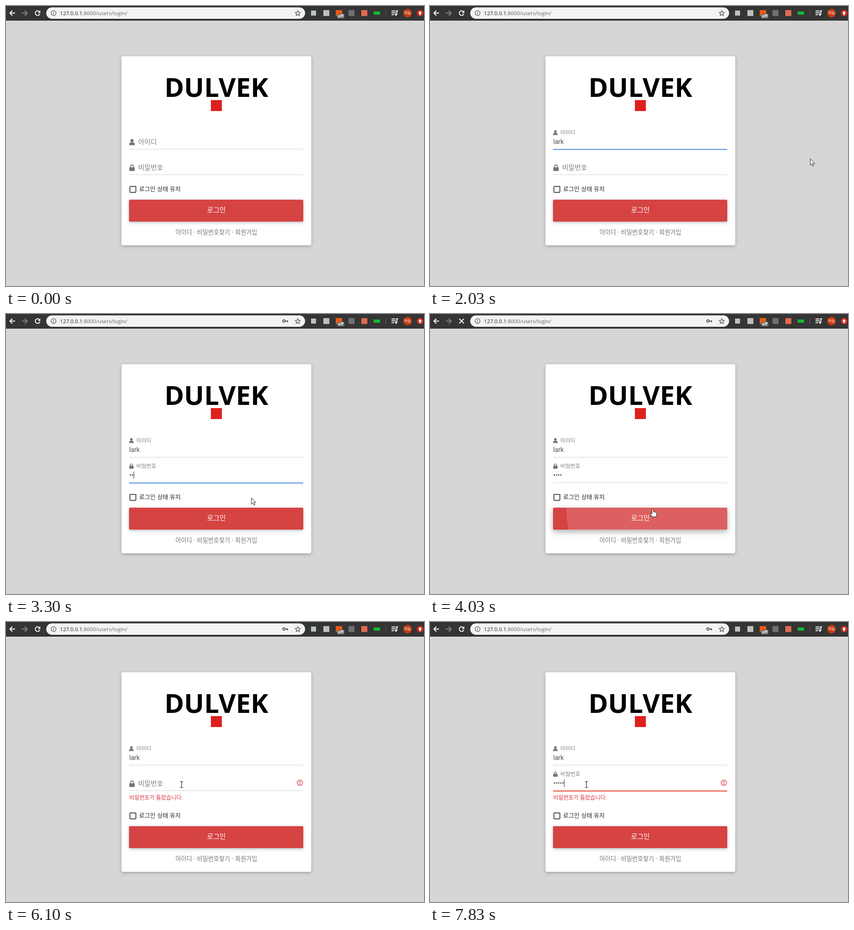
Recreate the animation shown at these times as an HTML page. Size 914 by 613 pixels, loop 8 s.

```html
<!DOCTYPE html>
<html lang="ko">
<head>
<meta charset="utf-8">
<title>로그인</title>
<style>
  html, body { margin: 0; width: 100%; height: 100%; overflow: hidden; background: #d6d6d6; }
  svg { display: block; }
  text { font-family: "Noto Sans CJK KR", "Noto Sans CJK", sans-serif; white-space: pre; }
  .url { font: 11.6px "Open Sans", "Noto Sans", sans-serif; }
  .word { font: 900 58px "Noto Sans", "Open Sans", sans-serif; }
  .value { font: 14px Roboto, sans-serif; fill: #495057; }
  .label { fill: #808080; font-size: 14.8px; font-weight: 300; }
  .line { fill: none; stroke: #fff; stroke-width: 2; }
  .ui { fill: none; stroke: #5f6368; stroke-width: 1.4; }
  #card, #button { filter: drop-shadow(0 2px 2.5px rgba(0,0,0,.16)) drop-shadow(0 2px 5px rgba(0,0,0,.12)); }
  #button.hover { filter: drop-shadow(0 5px 5.5px rgba(0,0,0,.18)) drop-shadow(0 4px 7.5px rgba(0,0,0,.15)); }
</style>
</head>
<body>
<svg width="914" height="613" viewBox="0 0 914 613">
  <defs>
    <clipPath id="buttonClip"><rect x="269" y="424" width="381" height="48" rx="2"/></clipPath>
  </defs>
  <rect width="914" height="613" fill="#d6d6d6"/>

  <!-- browser bar -->
  <rect width="914" height="32" fill="#353535"/>
  <rect y="31" width="914" height="1" fill="#292929"/>
  <path class="line" d="M20 15.5H9M14 10l-5.5 5.5L14 21"/>
  <path class="line" style="stroke:#858585" d="M35 15.5h11M41 10l5.5 5.5L41 21"/>
  <g id="reload">
    <path class="line" d="M73.2 12.4A5.1 5.1 0 1 0 74 17"/>
    <path d="M75 9.5v5.7h-5.7z" fill="#fff"/>
  </g>
  <path id="stop" class="line" d="M64 10.5l10 10M74 10.5l-10 10"/>
  <rect x="88" y="3" width="566" height="25" rx="12.5" fill="#f1f3f4"/>
  <circle class="ui" cx="104" cy="15.5" r="5.4"/>
  <path class="ui" d="M104 14.8v3.6M104 12.2v1.5"/>
  <text class="url" x="118" y="20" fill="#666"><tspan fill="#222">127.0.0.1</tspan>:8000/users/login/</text>
  <g id="key">
    <circle cx="607.6" cy="15.3" r="2.6" fill="none" stroke="#5f6368" stroke-width="2"/>
    <path d="M610.5 15.3h6.5M615 15.3v3" stroke="#5f6368" stroke-width="2.2"/>
  </g>
  <path class="ui" d="M638 10.2l1.6 3.7 4 .4-3 2.7.9 3.9-3.5-2.1-3.5 2.1.9-3.9-3-2.7 4-.4z"/>
  <rect x="667" y="10" width="11" height="11" fill="#b9c4bf"/>
  <rect x="694" y="9" width="13" height="13" fill="#bdbdbd"/>
  <rect x="721" y="9" width="14" height="13" fill="#ee5a13"/>
  <rect x="724" y="17" width="16" height="10" rx="2" fill="#6b6b6b"/>
  <text x="732" y="25" fill="#fff" text-anchor="middle" style="font:700 8.5px 'Open Sans',sans-serif">off</text>
  <rect x="749" y="9" width="13" height="13" fill="#707070"/>
  <rect x="777" y="9" width="13" height="13" fill="#e0694f"/>
  <rect x="804" y="12" width="14" height="7" fill="#16b834"/>
  <path d="M830.5 9v13" stroke="#666"/>
  <path class="line" d="M843 11h9M843 15h9M843 19h5.5M854.5 19v-8.4h3"/>
  <circle cx="852.8" cy="19" r="2.2" fill="#fff"/>
  <circle cx="878" cy="15.5" r="9.5" fill="#c23a10"/>
  <text x="878" y="18.4" fill="#fff" font-size="8" text-anchor="middle">하늘</text>
  <circle cx="905.5" cy="15.5" r="7" fill="#d92b20"/>
  <path d="M905.5 11.2l4.2 4.4h-2.6v3.9h-3.2v-3.9h-2.6z" fill="#fff"/>

  <!-- login card -->
  <rect id="card" x="252.5" y="110" width="415" height="414" rx="4" fill="#fff"/>
  <text class="word" x="460" y="199" text-anchor="middle">DULVEK</text>
  <rect x="448" y="206" width="24" height="24" fill="#df2020"/>

  <rect id="idLine" x="269" width="381" y="313"/>
  <rect id="pwLine" x="269" width="381" y="369"/>
  <g id="idLabel" fill="#757575">
    <circle cx="6.5" cy="-3.2" r="3.5"/>
    <path d="M.5 6.8V4.6a4 4 0 0 1 4-4h4a4 4 0 0 1 4 4v2.2z"/>
    <text class="label" x="20" y="5">아이디</text>
  </g>
  <g id="pwLabel" fill="#757575">
    <rect x=".5" y="-.8" width="12" height="8" rx="1.4"/>
    <path d="M3.4-.5v-2.4a3.1 3.1 0 0 1 6.2 0v2.4" fill="none" stroke="#757575" stroke-width="1.9"/>
    <text class="label" x="20" y="5">비밀번호</text>
  </g>
  <text id="idValue" class="value" x="269.5" y="302"></text>
  <text id="pwValue" class="value" x="269.5" y="358"></text>
  <rect id="caret" width="1" height="16" fill="#222"/>

  <g id="error" fill="#dc3545">
    <circle cx="642.5" cy="352" r="5.8" fill="none" stroke="#dc3545" stroke-width="1.4"/>
    <path d="M641.7 348.3h1.6v4.6h-1.6zM641.7 354h1.6v1.7h-1.6z"/>
    <text x="269.5" y="389" font-size="12">비밀번호가 틀렸습니다.</text>
  </g>

  <g id="lower">
    <rect x="271" y="395" width="13" height="13" rx="1" fill="#fff" stroke="#505050" stroke-width="2"/>
    <text x="291" y="405" font-size="13" fill="#212529">로그인 상태 유지</text>
    <g id="button"><rect x="269" y="424" width="381" height="48" rx="2" fill="#d64343"/></g>
    <circle id="ripple" cx="487" cy="428" fill="#fff" clip-path="url(#buttonClip)"/>
    <text x="460" y="452" font-size="14.8" fill="#fff" text-anchor="middle">로그인</text>
    <text x="460" y="500" font-size="13.1" fill="#757575" text-anchor="middle">아이디 · 비밀번호찾기 · 회원가입</text>
  </g>

  <!-- pointers -->
  <g id="pointer">
    <path id="arrow" d="M.5.5v14l3.2-3 2.3 5.2 2.2-1-2.3-5h4.5z" fill="#fff" stroke="#222"/>
    <path id="beam" d="M-3.5-6.5h2.5l1 1 1-1h2.5M-3.5 6.5h2.5l1-1 1 1h2.5M0-5.5v11" fill="none" stroke="#222" stroke-width="1.2"/>
    <path id="hand" d="M-1.5 1.5a1.5 1.5 0 0 1 3 0v4.5l6 1.3q1.5.5 1.3 2.2l-.8 4.5-1.4 3H-.8l-4.5-6q-.6-1.8 1.2-1.8l2.6 1.9z" fill="#fff" stroke="#222"/>
  </g>
</svg>
<script>
  const LOOP = 8000, FPS = 15;
  const USER = "lark";
  const FOCUS_ID = 1230, FOCUS_PW = 2500, SUBMIT = 3830, RELOADED = 5765, REFOCUS = 6630;
  const ID_KEYS = [1565, 1698, 1830, 1965];
  const PW_KEYS = [3100, 3230, 3365, 3430];
  const RETRY_KEYS = [7430, 7530, 7630, 7730, 7830];

  // time, x, y of the pointer
  const PATH = [
    [500, 886, 420], [570, 770, 392], [700, 500, 312], [830, 402, 287], [1300, 402, 287],
    [1430, 540, 440], [1500, 650, 501], [1570, 745, 445], [1635, 803, 358], [1700, 821, 333],
    [2030, 833, 334], [2165, 770, 342], [2430, 575, 356], [2630, 552, 362], [2900, 541, 388],
    [3300, 536, 402], [3430, 487, 425], [4030, 487, 427], [4630, 491, 366], [5765, 489, 366],
    [6100, 384, 356], [6500, 342, 356]
  ];

  const el = {};
  document.querySelectorAll("[id]").forEach(node => el[node.id] = node);

  const show = (node, on) => { node.style.display = on ? "" : "none"; };
  const within = (t, from, to) => t >= from && t < to;
  const set = (node, attrs) => { for (const k in attrs) node.setAttribute(k, attrs[k]); };
  const count = (keys, t) => keys.filter(key => t >= key).length;
  const easeOut = (t, start, length) => {
    const p = Math.min(1, Math.max(0, (t - start) / length));
    return 1 - (1 - p) ** 2;
  };

  function pointAt(t) {
    const next = PATH.findIndex(p => p[0] > t);
    if (next < 0) return PATH[PATH.length - 1].slice(1);
    if (next === 0) return PATH[0].slice(1);
    const [t0, x0, y0] = PATH[next - 1], [t1, x1, y1] = PATH[next];
    const p = (t - t0) / (t1 - t0);
    return [Math.round(x0 + (x1 - x0) * p), Math.round(y0 + (y1 - y0) * p)];
  }

  function placeLabel(node, y, raised) {
    node.setAttribute("transform",
      `translate(269 ${y - 21 * raised}) scale(${1 - 0.2 * raised})`);
  }

  function drawLine(node, focused, color) {
    set(node, { height: focused ? 2 : 1, fill: focused ? color : "#d0d3d6" });
  }

  function drawPointer(t, shift) {
    const [x, y] = pointAt(t);
    const inside = x >= 270 && x <= 650;
    const beam = inside && (within(y, 278, 314) || within(y, 337, 371));
    const hand = inside && within(y, 424 + shift, 473 + shift);
    show(el.pointer, t >= 500);
    show(el.beam, beam);
    show(el.hand, hand);
    show(el.arrow, !beam && !hand);
    set(el.pointer, { transform: `translate(${x} ${y})` });
  }

  function draw(t) {
    const failed = t >= RELOADED;
    const shift = failed ? 23 : 0;
    const idFocus = within(t, FOCUS_ID, FOCUS_PW);
    const pwFocus = within(t, FOCUS_PW, SUBMIT) || t >= REFOCUS;

    el.idValue.textContent = USER.slice(0, count(ID_KEYS, t));
    el.pwValue.textContent = "•".repeat(count(failed ? RETRY_KEYS : PW_KEYS, t));
    placeLabel(el.idLabel, 298, easeOut(t, FOCUS_ID, 200));
    placeLabel(el.pwLabel, 354, easeOut(t, failed ? REFOCUS : FOCUS_PW, 200));
    drawLine(el.idLine, idFocus, "#4a8fdf");
    drawLine(el.pwLine, pwFocus, failed ? "#e8473a" : "#4a8fdf");

    const caretOff = within(t, 2030, FOCUS_PW) || within(t, 7165, RETRY_KEYS[0]);
    const active = idFocus ? el.idValue : el.pwValue;
    show(el.caret, (idFocus || pwFocus) && !caretOff);
    set(el.caret, { x: Math.round(269.7 + active.getComputedTextLength()), y: idFocus ? 289 : 345 });

    show(el.error, failed);
    set(el.lower, { transform: `translate(0 ${shift})` });
    set(el.card, { height: 414 + shift });
    el.button.classList.toggle("hover", within(t, 3565, RELOADED));

    const wave = easeOut(t, SUBMIT, 700);
    set(el.ripple, { r: 380 * wave, opacity: 0.3 * (1 - wave) });

    const loading = within(t, 3900, RELOADED);
    show(el.stop, loading);
    show(el.reload, !loading);
    show(el.key, t >= PW_KEYS[0]);
    drawPointer(t, shift);
  }

  // The picture advances in whole steps that fall on half counts of the rate.
  function tick() {
    const t = performance.now() % LOOP;
    const step = Math.floor((t + 4) * FPS / 1000 + 0.5) - 0.5;
    draw(step * 1000 / FPS);
    requestAnimationFrame(tick);
  }
  tick();
</script>
</body>
</html>
```
